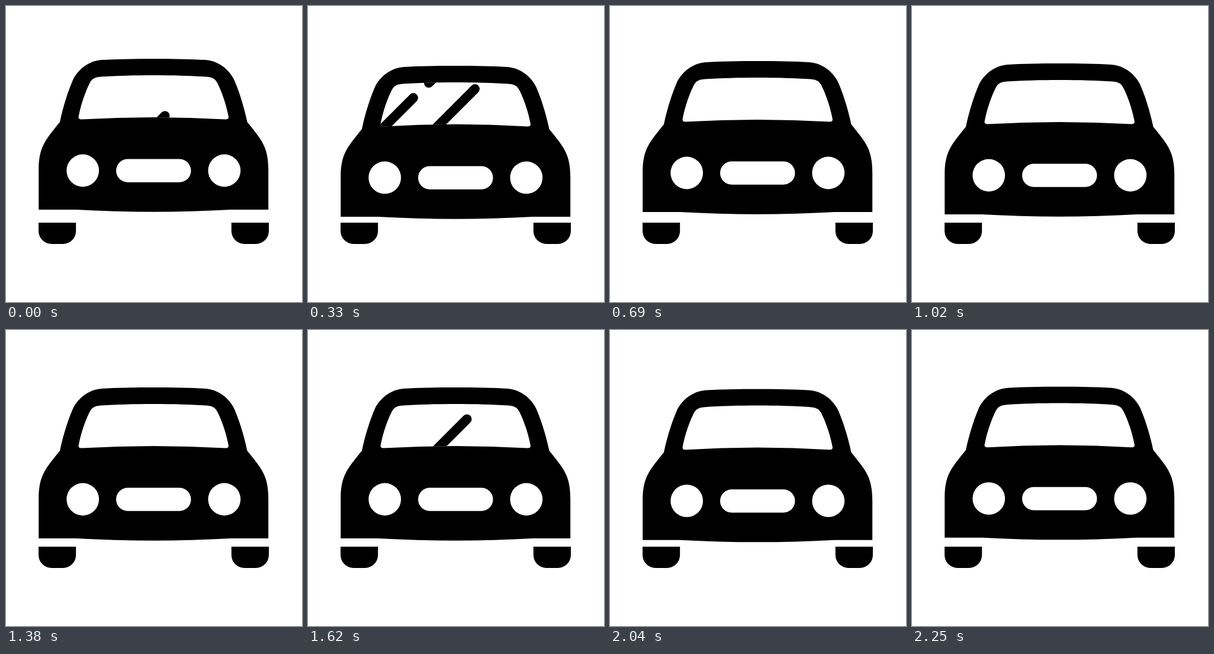
Write an HTML page that moves like this. It is 500x500 px and loops after 2.28 s.

```html
<!DOCTYPE html>
<html>
<head>
<meta charset="utf-8">
<style>
  html, body { margin: 0; height: 100%; overflow: hidden; background: #fff; }
  svg { display: block; width: 100vw; height: 100vh; }
</style>
</head>
<body>
<svg viewBox="0 0 500 500">
  <defs>
    <path id="pane" d="M123 185C127 165 134 145 141 131C145 123 149 120.5 160 119.5
      C210 116.1 288.5 116.1 338.5 119.5C349.5 120.5 353.5 123 357.5 131
      C364.5 145 371.5 165 375.5 185Q377.5 191.8 371 191.5
      Q249.25 184.3 127.5 191.5Q121 191.8 123 185Z"/>
    <clipPath id="glass"><use href="#pane"/></clipPath>
  </defs>
  <g id="car">
    <path d="M55.2 344V278C55.2 238 66 227 91 196C97 167 106 141 113 125
      C121 108 139 92.5 162 91C210 88.5 288.5 88.5 336.5 91
      C359.5 92.5 377.5 108 385.5 125C392.5 141 401.5 167 407.5 196
      C432.5 227 443.2 238 443.2 278V344H380Q249.25 351.4 118 344Z"/>
    <g fill="#fff">
      <use href="#pane"/>
      <circle cx="129.7" cy="278" r="27.4"/>
      <circle cx="368.8" cy="278" r="27.4"/>
      <rect x="186" y="258.5" width="126.5" height="39.3" rx="19.65"/>
    </g>
    <g clip-path="url(#glass)">
      <path id="glare" fill="none" stroke="#000" stroke-width="16" stroke-linecap="round"
        d="M268.5 185.5L204 250M282 260L217 325M178 275L113 340"/>
    </g>
  </g>
  <path id="wheel" d="M55 366H118.2V380a22 22 0 0 1-22 22H77a22 22 0 0 1-22-22Z"/>
  <use href="#wheel" x="325.8"/>
</svg>
<script>
  const LOOP = 2280, STEP = 30;
  const BOB = 600, BOB_HEIGHT = 13.3;
  const SWEEP = 840, SWEEP_EVERY = 1440, SWEEP_HEIGHT = 394;
  const car = document.getElementById('car');
  const glare = document.getElementById('glare');
  const easeInOut = p => (1 - Math.cos(Math.PI * p)) / 2;
  const moveY = (el, y) => el.setAttribute('transform', `translate(0 ${y})`);

  function draw(now) {
    const t = Math.floor(now % LOOP / STEP) * STEP;
    const bob = 1 - Math.abs(1 - t % BOB / (BOB / 2));
    const sweep = Math.min(1, t % SWEEP_EVERY / SWEEP);
    moveY(car, BOB_HEIGHT * bob);
    moveY(glare, -SWEEP_HEIGHT * easeInOut(sweep));
  }

  const start = performance.now();
  function tick() {
    draw(performance.now() - start);
    requestAnimationFrame(tick);
  }
  tick();
</script>
</body>
</html>
```
